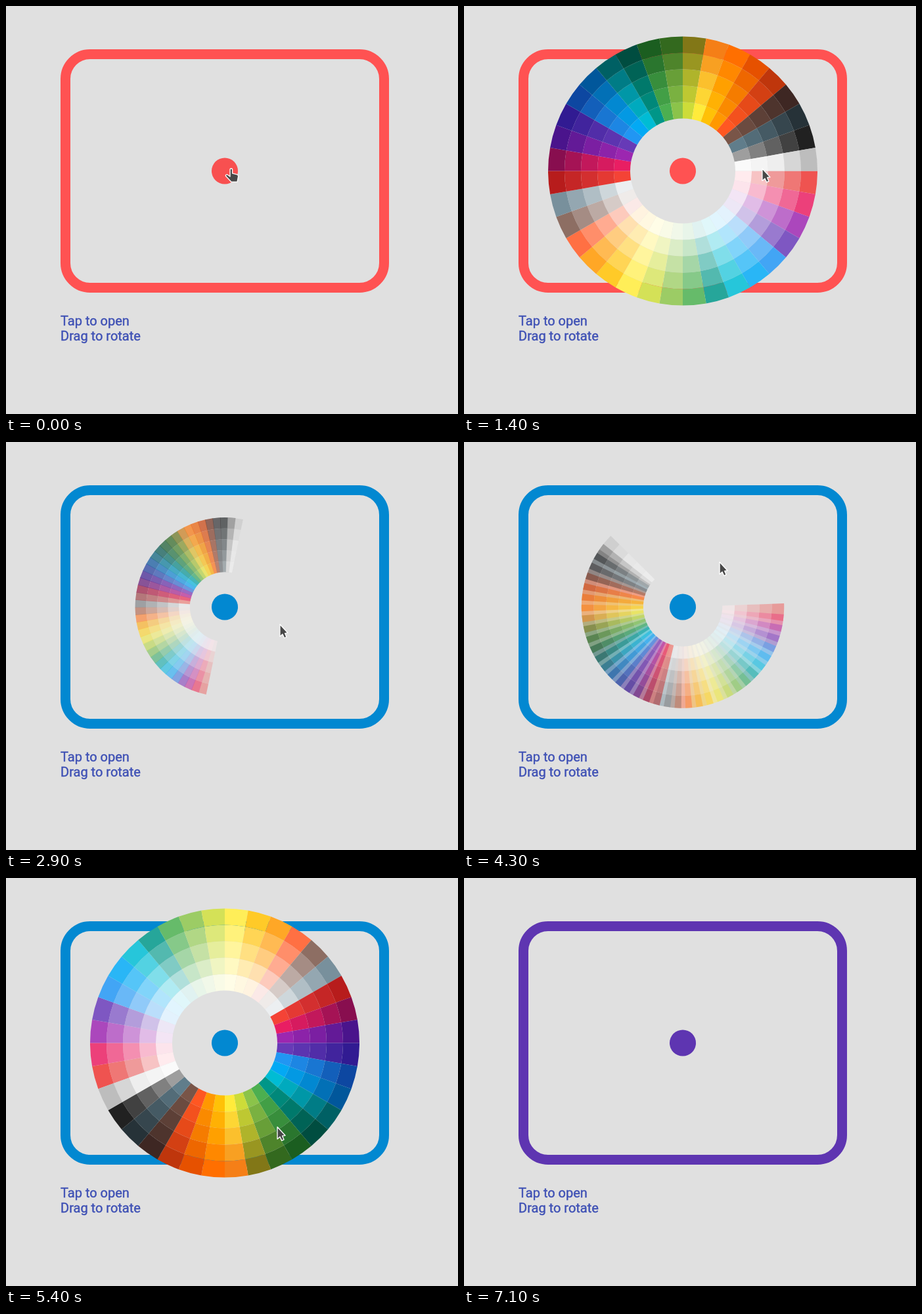
Animation of 688x622 px, one loop 8000 ms. Source, as an HTML page:

```html
<!DOCTYPE html>
<html lang="en">
<head>
<meta charset="utf-8">
<title>Colour wheel</title>
<style>
  html, body { margin: 0; width: 100%; height: 100%; overflow: hidden; background: #e0e0e0; }
  svg { display: block; width: 688px; height: 622px; }
  text { font: 20px Roboto, sans-serif; fill: #3f51b5; stroke: #3f51b5; stroke-width: .45px; }
</style>
</head>
<body>
<svg viewBox="0 0 688 622">
  <rect id="border" x="90.5" y="73.5" width="485" height="356" rx="37.5" fill="none" stroke-width="15"/>
  <g id="wheel"></g>
  <circle id="dot" cx="333" cy="251.5" r="20"/>
  <text x="83" y="487">Tap to open</text>
  <text x="83" y="510">Drag to rotate</text>
  <g id="cursor" fill="#484848" stroke="#fff" stroke-width="1.3" stroke-linejoin="round">
    <path id="arrow" d="M0 0V18.5L4 15L6.7 20.8L10 19.3L7.6 13.6L12 13Z"/>
    <path id="hand" d="M-2 1.2C-2-.8 1.6-.8 1.6 1.2V7L8.5 8.8Q10.8 9.5 10.5 12L9 20H-.2L-8.3 11.5C-9.5 9.6-7.2 8-5.4 9.4L-2 12Z"/>
  </g>
</svg>
<script>
const LOOP = 8000, STEP = 100, CENTER = { x: 333, y: 251.5 };
const INNER = 80, RING = 25, RINGS = 5, SLICE = 10, FADE = 600;
const OPENINGS = [[550, 2597], [3974, 6120]];

// Each hue: three stops for its light slice, three for its dark slice.
const HUES = `
ffebee ef9a9a ef5350 f44336 d32f2f b71c1c
fce4ec f48fb1 ec407a e91e63 c2185b 880e4f
f3e5f5 ce93d8 ab47bc 9c27b0 7b1fa2 4a148c
ede7f6 b39ddb 7e57c2 673ab7 512da8 311b92
e3f2fd 90caf9 42a5f5 2196f3 1976d2 0d47a1
e1f5fe 81d4fa 29b6f6 03a9f4 0288d1 01579b
e0f7fa 80deea 26c6da 00bcd4 0097a7 006064
e0f2f1 80cbc4 26a69a 009688 00796b 004d40
e8f5e9 a5d6a7 66bb6a 4caf50 388e3c 1b5e20
f1f8e9 c5e1a5 9ccc65 8bc34a 689f38 33691e
f9fbe7 e6ee9c d4e157 cddc39 afb42b 827717
fffde7 fff59d ffee58 ffeb3b fbc02d f57f17
fff8e1 ffe082 ffca28 ffc107 ffa000 ff6f00
fff3e0 ffcc80 ffa726 ff9800 f57c00 e65100
fbe9e7 ffab91 ff7043 ff5722 e64a19 bf360c
efebe9 bcaaa4 8d6e63 795548 5d4037 3e2723
eceff1 b0bec5 78909c 607d8b 455a64 263238
fafafa eeeeee bdbdbd 9e9e9e 616161 212121`.trim().split('\n').map(row => row.split(' '));

// Pointer path around the centre: time, angle, radius.
const POINTER = [
  [400, -19, 10.6], [700, -14, 17], [1000, -8, 70], [1300, -3, 117], [1400, -1.7, 121],
  [1500, -27, 182], [1700, 2, 196], [1900, 45, 192], [2100, 75, 182], [2200, 12, 185],
  [2300, -33, 142], [2600, -33, 140], [2900, 17.5, 88], [3300, 46, 17], [3500, -10, 8],
  [3700, -10, 8], [4000, -20, 9], [4300, -50.7, 88.5], [4500, -104, 150], [4800, -140, 190],
  [5000, -190, 232], [5200, -250, 190], [5400, -302, 151], [5600, -345, 150],
  [5750, -358, 150], [6100, -413.5, 108], [6300, -413.5, 108], [7000, -497, 353]
];

const byId = id => document.getElementById(id);
const clamp = (v, lo, hi) => Math.min(hi, Math.max(lo, v));
const polar = (angle, r) => [r * Math.cos(angle * Math.PI / 180), r * Math.sin(angle * Math.PI / 180)];
const easeInOut = t => t < .5 ? 4 * t ** 3 : 1 - 4 * (1 - t) ** 3;

function svg(tag, parent, attrs = {}) {
  const node = document.createElementNS('http://www.w3.org/2000/svg', tag);
  for (const key in attrs) node.setAttribute(key, attrs[key]);
  return parent.appendChild(node);
}

function mix(a, b) {
  const channel = (hex, i) => parseInt(hex.slice(i, i + 2), 16);
  return '#' + [0, 2, 4].map(i =>
    Math.round((channel(a, i) + channel(b, i)) / 2).toString(16).padStart(2, '0')).join('');
}

function ringPath(ring) {
  const r0 = INNER + ring * RING, r1 = r0 + RING;
  return `M${polar(0, r0)}L${polar(0, r1)}A${r1} ${r1} 0 0 1 ${polar(SLICE, r1)}` +
    `L${polar(SLICE, r0)}A${r0} ${r0} 0 0 0 ${polar(0, r0)}Z`;
}

const light = HUES.map(h => h.slice(0, 3)), dark = HUES.map(h => h.slice(3));
const palettes = [...light.slice(0, -1), ...dark, light[light.length - 1]];
const slices = palettes.map(stops => {
  const group = svg('g', byId('wheel'));
  for (let ring = 0; ring < RINGS; ring++) {
    const fill = mix(stops[Math.floor(ring / 2)], stops[Math.ceil(ring / 2)]);
    svg('path', group, { d: ringPath(ring), fill });
  }
  return group;
});

function pointerAt(time) {
  const t = clamp(time, POINTER[0][0], POINTER[POINTER.length - 1][0]);
  const next = Math.max(1, POINTER.findIndex(key => key[0] >= t));
  const [t0, a0, r0] = POINTER[next - 1], [t1, a1, r1] = POINTER[next];
  const k = (t - t0) / (t1 - t0);
  return { angle: a0 + (a1 - a0) * k, radius: r0 + (r1 - r0) * k };
}

// The wheel follows the pointer while it is dragged.
function rotationAt(t) {
  return t < OPENINGS[1][0]
    ? pointerAt(clamp(t, 1500, 2100)).angle + 27
    : pointerAt(clamp(t, 4500, 5750)).angle + 102;
}

function opennessAt(t) {
  return Math.max(...OPENINGS.map(([open, close]) =>
    clamp(Math.min((t - open) / FADE, 1 - (t - close) / FADE), 0, 1)));
}

function render(t) {
  const color = t < OPENINGS[0][1] ? '#ff5252' : t < OPENINGS[1][1] ? '#0288d1' : '#5e35b1';
  const open = opennessAt(t), spread = easeInOut(open), rotation = rotationAt(t);
  const { angle, radius } = pointerAt(t), [dx, dy] = polar(angle, radius);
  const hover = radius < 20;

  byId('border').setAttribute('stroke', color);
  byId('dot').setAttribute('fill', hover ? mix(color.slice(1), mix(color.slice(1), 'e04a4a').slice(1)) : color);
  if (hover && t > 2597) byId('dot').setAttribute('fill', '#0583c8');

  byId('wheel').setAttribute('visibility', open > 0 ? 'visible' : 'hidden');
  byId('wheel').setAttribute('transform',
    `translate(${CENTER.x} ${CENTER.y}) rotate(${rotation}) scale(${.35 + .65 * spread})`);
  slices.forEach((slice, i) => {
    slice.setAttribute('transform', `rotate(${i * SLICE * spread})`);
    slice.setAttribute('opacity', open ** 1.2);
  });

  byId('cursor').setAttribute('transform', `translate(${CENTER.x + dx} ${CENTER.y + dy})`);
  byId('cursor').setAttribute('visibility', t < 7100 ? 'visible' : 'hidden');
  byId('hand').setAttribute('display', hover ? 'inline' : 'none');
  byId('arrow').setAttribute('display', hover ? 'none' : 'inline');
}

const start = performance.now();
function tick() {
  const t = (performance.now() - start) % LOOP;
  render(Math.floor(t / STEP) * STEP);
  requestAnimationFrame(tick);
}
tick();
</script>
</body>
</html>
```
